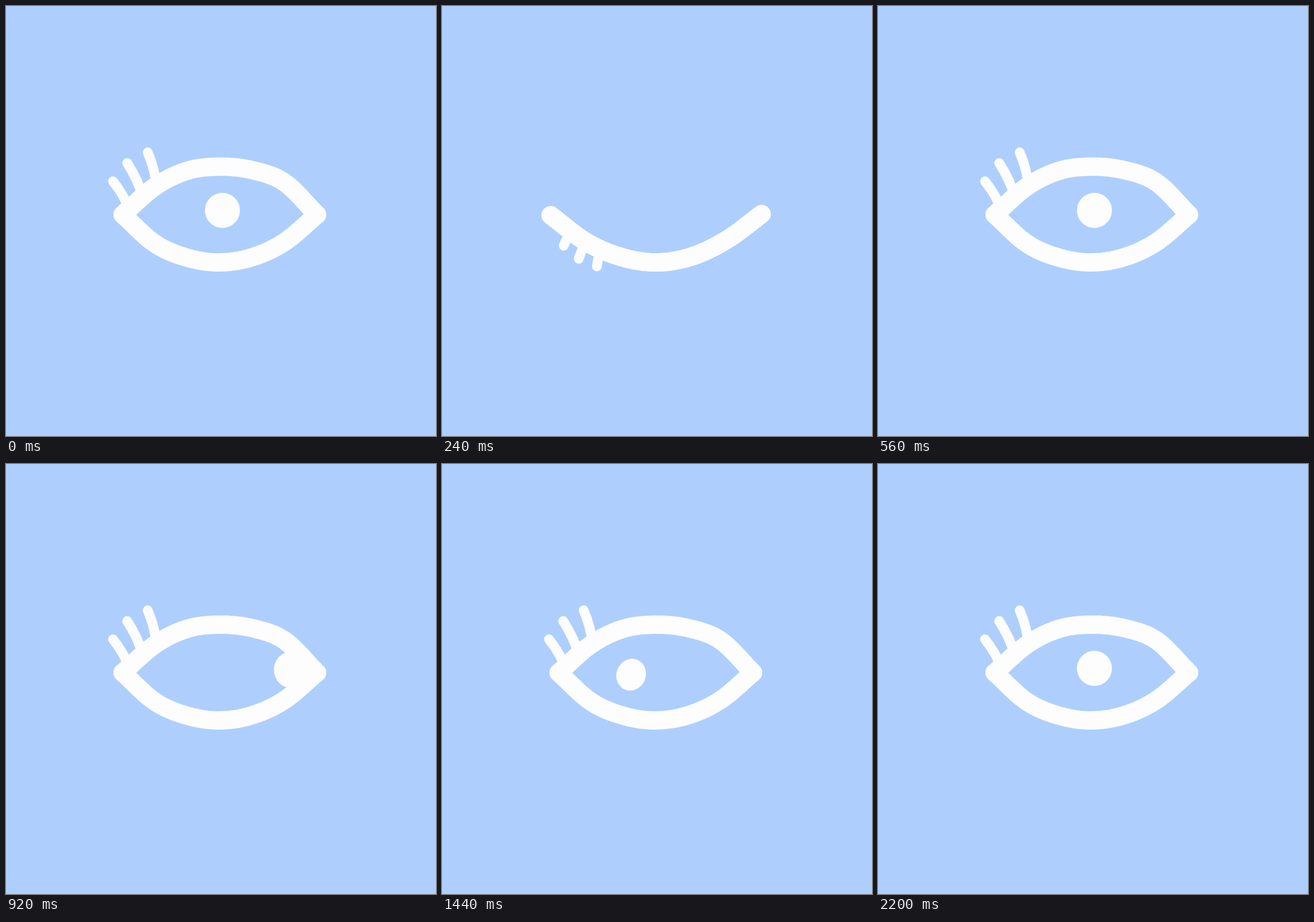
An HTML page with a canvas that plays this animation: 748x748 px, repeating every 2720 ms.

```html
<!DOCTYPE html>
<html lang="en">
<head>
<meta charset="utf-8">
<title>Blinking eye</title>
<style>
  html, body { margin: 0; width: 100%; height: 100%; overflow: hidden; background: #aecffd; }
  canvas { display: block; width: 100vmin; height: 100vmin; }
</style>
</head>
<body>
<canvas id="stage" width="748" height="748"></canvas>
<script>
const ctx = document.getElementById('stage').getContext('2d');
const LOOP = 2720, STEP = 40;
const BACK = '#aecffd', INK = '#fdfdfd';

const linear = k => k;
const into = k => Math.pow(k, 1.2);
const out = k => 1 - Math.pow(1 - k, 1.6);
const smooth = k => k * k * (3 - 2 * k);
const cubic = k => k < 0.5 ? 4 * k ** 3 : 1 - 4 * (1 - k) ** 3;

const mix = (a, b, k) => Array.isArray(a) ? a.map((v, i) => mix(v, b[i], k)) : a + (b - a) * k;

// A lid runs between two corners, with heights at even steps in x.
function lid(from, to, heights) {
  const count = heights.length + 1;
  return [from, ...heights.map((y, i) => [mix(from[0], to[0], (i + 1) / count), y]), to];
}

// Point on the Catmull-Rom spline through pts, u from 0 to 1.
function along(pts, u) {
  const last = pts.length - 1;
  const i = Math.min(Math.floor(u * last), last - 1), t = u * last - i;
  const b = pts[i], c = pts[i + 1];
  const a = pts[i - 1] || mix(c, b, 2), d = pts[i + 2] || mix(b, c, 2);
  return b.map((p, n) => p + t / 2 * (c[n] - a[n]
    + t * (2 * a[n] - 5 * p + 4 * c[n] - d[n] + t * (3 * (p - c[n]) + d[n] - a[n]))));
}

const curve = (pts, count = 60) => Array.from({ length: count + 1 }, (_, i) => along(pts, i / count));

// Lashes: place of the first on the lid, gap to the next, and lift (1 is up, below 0 is down).
const pose = (from, to, upper, lower, lashes) => [lid(from, to, upper), lid(from, to, lower), lashes];

const closed = [410, 436.5, 446, 436, 407];
const open = pose([203, 363], [541, 363],
  [314, 286.5, 279.5, 285.5, 307], [413.5, 438, 446, 437, 410.5], [0.033, 0.07, 1]);
const half = pose([196, 361], [538, 357],
  [359.7, 359.3, 360, 361, 362], [411, 434, 443, 430.5, 404], [0.078, 0.07, 0.28]);
const shut = pose([189, 364], [556, 362], closed, closed, [0.1, 0.07, -0.5]);
const rising = pose([198, 354], [544, 358],
  [348, 345.5, 343, 342.7, 349], [406, 433.5, 444.8, 439, 413], [0.04, 0.042, 0.2]);

const reach = [[-28, -48], [-27, -58], [-15, -58]];

// Pupil: x, y, rx, ry, tilt.
const rest = [376.5, 355.5, 30.5, 30.5, 0];
const wide = [371.5, 361, 33.5, 33, 0];
const right = [497, 358, 31, 32, 0];
const pass = [329, 366.5, 25.5, 28, 0.4];
const left = [228, 363, 27, 31, 0.3];

// Keys: arrival, departure, pose, easing towards the next key.
const lidKeys = [
  [0, 0, open, linear], [120, 120, half, out], [220, 240, shut, linear],
  [360, 360, rising, out], [560, LOOP, open]
];
const pupilKeys = [
  [0, 120, rest, linear], [360, 360, wide, smooth], [560, 600, rest, linear],
  [680, 680, wide, smooth], [920, 960, right, into], [1440, 1480, pass, out],
  [1720, 1760, left, cubic], [2200, LOOP, rest]
];

function sample(keys, t) {
  const i = keys.findLastIndex(key => key[0] <= t);
  const [, leave, from, ease] = keys[i];
  if (t <= leave) return from;
  const [arrive, , to] = keys[i + 1];
  return mix(from, to, ease((t - leave) / (arrive - leave)));
}

function stroke(width, build) {
  ctx.lineWidth = width;
  ctx.beginPath();
  build();
  ctx.stroke();
}

const trace = pts => pts.forEach(p => ctx.lineTo(...p));

function drawLash(root, [dx, dy], lift) {
  const x = root[0] + dx * Math.abs(lift), y = root[1] + dy * lift;
  stroke(17, () => {
    ctx.moveTo(x, y);
    ctx.quadraticCurveTo((x + root[0]) / 2 + 5 * lift, (y + root[1]) / 2, ...root);
  });
}

function draw(t) {
  const [top, bottom, [first, gap, lift]] = sample(lidKeys, t);
  const upper = curve(top), lower = curve(bottom);

  ctx.fillStyle = BACK;
  ctx.fillRect(0, 0, 748, 748);
  ctx.fillStyle = ctx.strokeStyle = INK;
  ctx.lineCap = ctx.lineJoin = 'round';

  // The pupil shows only between the lids.
  ctx.save();
  ctx.beginPath();
  trace([...upper, ...lower.slice().reverse()]);
  ctx.clip();
  ctx.beginPath();
  ctx.ellipse(...sample(pupilKeys, t), 0, Math.PI * 2);
  ctx.fill();
  ctx.restore();

  reach.forEach((arm, i) => drawLash(along(top, first + gap * i), arm, lift));
  stroke(32, () => trace(upper));
  stroke(32, () => trace(lower));
}

const start = performance.now();
function tick() {
  const t = (performance.now() - start) % LOOP;
  draw(Math.floor(t / STEP) * STEP);
  requestAnimationFrame(tick);
}
tick();
</script>
</body>
</html>
```
